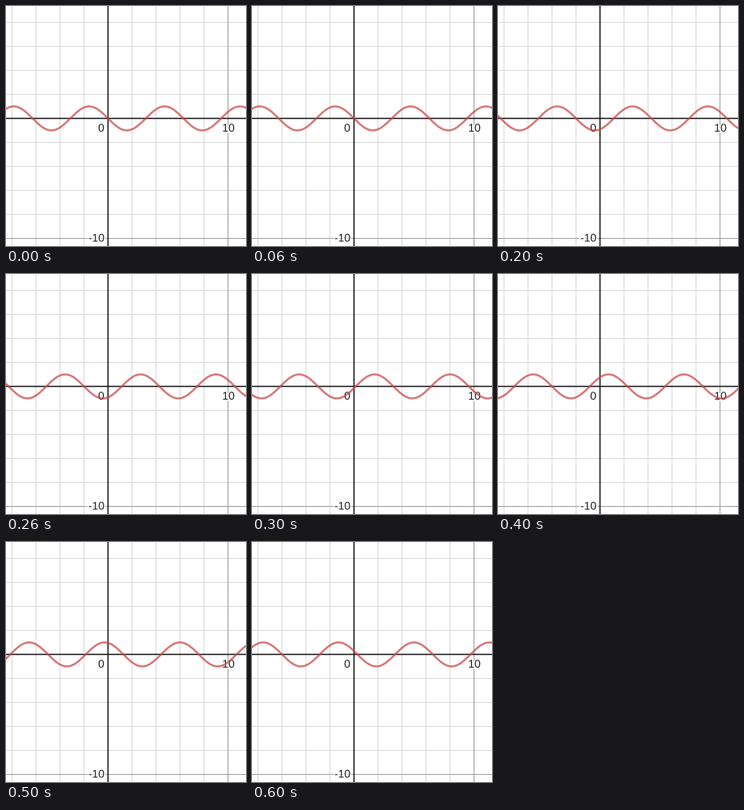
Write a matplotlib script that moves like this. It is 300 by 300 pixels and loops after 0.7 s.

```python
import numpy as np
import matplotlib.pyplot as plt
from matplotlib import patheffects
from matplotlib.animation import FuncAnimation

SIZE, DPI = 300, 100
PX = 72 / DPI                 # one pixel in points
UNIT = 15                     # pixels per graph unit
OX, OY = 127.5, 140.5         # pixel position of the origin
FRAMES, STEP_MS = 7, 100

fig = plt.figure(figsize=(SIZE / DPI, SIZE / DPI), dpi=DPI, facecolor="white")
ax = fig.add_axes([0, 0, 1, 1])
ax.set_xlim(0, SIZE)
ax.set_ylim(SIZE, 0)
ax.axis("off")


def rule(color, width, z, x=None, y=None):
    xs = [0, SIZE] if x is None else [x, x]
    ys = [0, SIZE] if y is None else [y, y]
    ax.plot(xs, ys, color=color, lw=width * PX, zorder=z, snap=False)


def label(text, x, y, align):
    halo = patheffects.withStroke(linewidth=3 * PX, foreground="white")
    ax.text(x, y, text, ha=align, va="baseline", family="Liberation Sans",
            fontsize=14 * PX, color="#222222", zorder=4, path_effects=[halo])


for k in range(-8, 12, 2):
    if k in (0, 10):
        continue
    rule("#d9d9d9", 1, 1, x=OX + k * UNIT)
for k in range(-8, 10, 2):
    if k:
        rule("#d9d9d9", 1, 1, y=OY + k * UNIT)
rule("#9c9c9c", 1, 2, x=OX + 10 * UNIT)
rule("#9c9c9c", 1, 2, y=OY + 10 * UNIT)
rule("#111111", 1.5, 3, x=OX)
rule("#111111", 1.5, 3, y=OY)

label("0", 119, 157, "center")
label("10", 278, 157, "center")
label("-10", 123, 294.5, "right")

px = np.linspace(-3, SIZE + 3, 613)
wave, = ax.plot(px, px, color="#c74440", alpha=0.72, lw=2.5 * PX, zorder=5)


def draw(i):
    # the wave slides left by one unit per step
    wave.set_ydata(OY + UNIT * np.sin((px - OX) / UNIT + i))
    return wave,


anim = FuncAnimation(fig, draw, frames=FRAMES, interval=STEP_MS,
                     repeat=True, repeat_delay=0)
plt.show()
```
